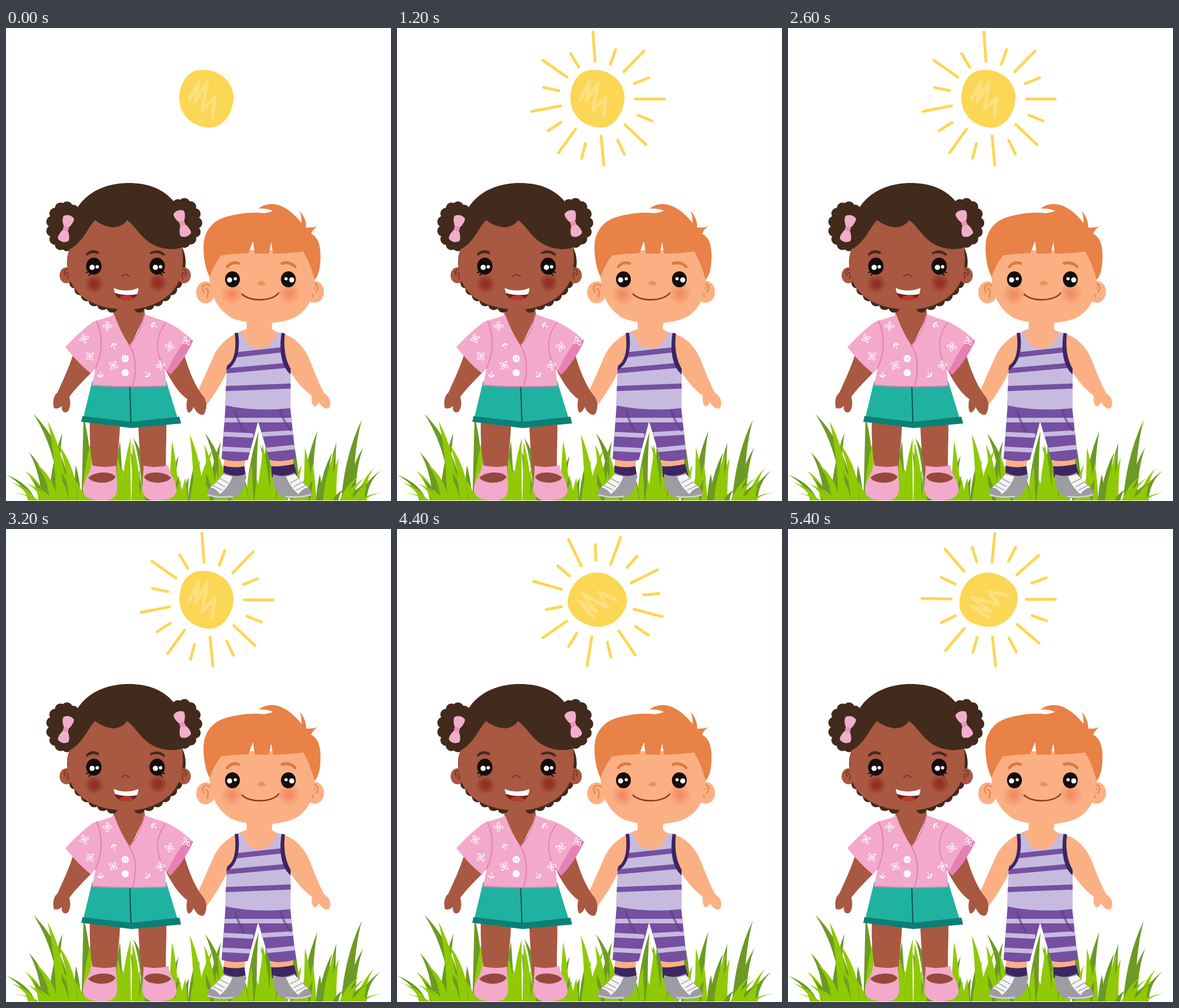
These frames come from a looping animation (675x830 px, 5610 ms). An HTML page:

```html
<!DOCTYPE html>
<html lang="en">
<head>
<meta charset="utf-8">
<title>Two friends under the sun</title>
<style>
  html, body { margin: 0; width: 100%; height: 100%; overflow: hidden; background: #fff; }
  svg { display: block; width: 100vw; height: 100vh; }
  .skin { fill: #a95841; }
  .hair { fill: #422a1d; }
  .pink { fill: #f3a9cc; }
  .peach { fill: #fbb084; }
  .ginger { fill: #e88246; }
  .lilac { fill: #c7badf; }
  .purple { fill: #754fa0; }
  .plum { fill: #3d2562; }
  .eye { fill: #140d0c; }
  .white { fill: #fff; }
  .line { fill: none; stroke-linecap: round; stroke-linejoin: round; }
</style>
</head>
<body>
<svg viewBox="0 0 675 830" preserveAspectRatio="none">
  <defs>
    <radialGradient id="blushDark">
      <stop offset=".3" stop-color="#8d2a20" stop-opacity=".85"/><stop offset="1" stop-color="#8d2a20" stop-opacity="0"/>
    </radialGradient>
    <radialGradient id="blushLight">
      <stop offset=".1" stop-color="#f28a62"/><stop offset="1" stop-color="#f28a62" stop-opacity="0"/>
    </radialGradient>
    <path id="lobe" d="M0 2C-7-4-12-17-9-21Q0-27 9-21C12-17 7-4 0 2Z"/>
    <g id="bow" fill="#f1aecb">
      <use href="#lobe"/><use href="#lobe" transform="rotate(180)"/>
      <ellipse rx="5" ry="4.5" fill="#e993ba"/>
    </g>
    <g id="flower" class="line" stroke="#fff" stroke-width="1.1"></g>
    <path id="sprig" class="white" d="M0 6Q-1 0 1-6L2-5Q0 0 1 6ZM0 5Q-5 4-5 0Q-1 0 0 5ZM1 5Q6 4 6 0Q2 0 1 5Z"/>
    <g id="ear">
      <ellipse rx="12" ry="14" stroke="none"/>
      <path class="line" stroke-width="2" d="M6-8C-1-14-7-7-2 0M0-5Q5-4 2 6"/>
    </g>
    <g id="girlEye">
      <ellipse class="eye" rx="13.5" ry="15"/>
      <circle class="white" cx="-3" cy="2" r="4.6"/><circle class="white" cx="6" cy="1" r="3"/>
    </g>
    <path id="lashes" class="line" stroke="#140d0c" stroke-width="1.8" d="M-8 10L-13 11M-5 13L-9 16"/>
    <g id="girlShoe">
      <path class="pink" d="M149 767C149 781 134 794 135 812C136 826 154 829 170 829C189 829 195 820 195 806C194 790 193 780 193 768Q170 773 149 767Z"/>
      <path fill="#96493a" d="M144 789Q153 781 168 780Q187 779 192 788Q186 798 166 798Q150 797 144 789Z"/>
    </g>
    <g id="boyShoe">
      <path fill="#9d9ca2" d="M382 780C374 796 352 806 352 817C354 826 386 826 400 824C414 819 421 803 420 783Q401 790 382 780Z"/>
      <path fill="#f4f4f5" d="M381 783Q366 801 358 806Q369 808 375 818Q390 806 397 787Z"/>
      <path class="line" stroke="#a9a8ad" stroke-width="1.6" d="M374 790L389 798M369 797L383 805M363 803L379 811"/>
      <path class="line" stroke="#d5d4d8" stroke-width="2.5" d="M354 819Q371 825 397 822"/>
    </g>
    <clipPath id="mouthClip"><path id="mouth" d="M189 456C200 462 220 462 232 456C233 470 224 478 211 478C197 478 189 469 189 456Z"/></clipPath>
    <clipPath id="tankClip"><path id="tank" d="M401 535L415 534C421 572 467 572 474 534L488 535C483 570 489 590 499 606L499 667Q440 674 384 662L387 598C402 590 408 570 401 535Z"/></clipPath>
    <clipPath id="shortsClip"><path id="shorts" d="M385 662Q440 674 498 663L508 755Q485 763 462 758L442 690L424 758Q400 763 378 756Z"/></clipPath>
  </defs>

  <g id="sun">
    <g id="rays" class="line" stroke="#fcd655" stroke-width="5"></g>
    <path fill="#fcd655" d="M338 74C374 70 399 95 399 122C398 152 378 176 356 175C324 173 303 150 304 121C305 96 318 76 338 74Z"/>
    <path class="line" stroke="#fce07f" stroke-width="6" d="M321 126L338 94L332 128L353 95L344 144L366 122L362 156"/>
  </g>

  <g id="grass"></g>

  <g id="boy">
    <path class="peach" d="M422 505L422 528C392 538 372 555 362 580C352 603 342 625 334 643C331 652 334 666 346 668C362 650 378 624 390 598L410 585L480 585L497 600C508 620 523 636 536 645C535 655 537 662 541 664C546 663 547 659 549 657C553 664 560 670 566 667C571 659 569 648 558 641C549 625 541 604 534 586C524 560 508 544 488 537C474 534 466 530 466 526L468 505Z"/>
    <path class="peach" d="M383 752L381 772L418 772L420 752ZM465 752L465 770L504 768L503 752Z"/>
    <path class="plum" d="M381 768Q400 773 418 769L421 790L382 790ZM465 769Q484 770 505 765L511 788L466 788Z"/>
    <use href="#boyShoe"/>
    <use href="#boyShoe" transform="matrix(-1 0 0 1 888 0)"/>

    <use href="#shorts" class="purple"/>
    <g clip-path="url(#shortsClip)">
      <path class="line" stroke="#c7badf" stroke-width="8" d="M370 688L515 688M370 712L430 715M450 713L515 709M370 738L430 741M450 741L520 734"/>
      <path class="line" stroke="#5b3c89" stroke-opacity=".6" stroke-width="4" d="M402 672Q407 691 417 707M480 668Q486 690 499 706"/>
    </g>
    <use href="#tank" class="lilac"/>
    <path class="line" clip-path="url(#tankClip)" stroke="#754fa0" stroke-width="9" d="M380 576L500 563M380 602L505 591M380 633L505 628"/>
    <path class="plum" d="M401 535L407 535C412 570 402 594 386 600L388 592C402 583 404 560 401 535ZM483 535L489 536C486 562 490 582 499 598L499 608C481 592 479 562 483 535Z"/>

    <g class="peach" stroke="#e48a58">
      <use href="#ear" transform="translate(350 464)scale(1.38)"/>
      <use href="#ear" transform="translate(541 463)scale(-1.38 1.38)"/>
    </g>
    <path class="peach" d="M358 390C352 450 360 486 394 508C420 521 480 522 508 507C541 488 546 450 537 390Z"/>
    <path class="ginger" d="M357 437C347 418 344 386 348 369C354 348 368 337 384 332C404 326 430 322 452 325Q464 323 468 321Q457 316 443 317C455 306 474 308 484 313C500 321 510 332 518 342Q519 331 515 321C523 331 527 340 526 350Q537 351 546 348Q538 353 535 361C549 368 553 386 551 412C550 424 547 436 541 442Q533 411 521 392Q495 396 468 396L465 376L461 396L436 396L433 374L425 395Q398 396 377 399Q363 418 357 437Z"/>
    <path class="line" stroke="#d97b40" stroke-width="5" d="M388 419Q396 409 408 413M484 413Q497 409 507 419"/>
    <circle cx="396" cy="467" r="21" fill="url(#blushLight)"/>
    <circle cx="496" cy="466" r="21" fill="url(#blushLight)"/>
    <g class="eye"><ellipse cx="397" cy="441" rx="13" ry="14"/><ellipse cx="495" cy="441" rx="13" ry="14"/></g>
    <g class="white"><circle cx="392" cy="442" r="4.5"/><circle cx="402" cy="440" r="2.8"/><circle cx="501" cy="442" r="4.5"/><circle cx="491" cy="440" r="2.8"/></g>
    <path fill="#ee8f60" d="M440 449Q448 438 456 449Q448 455 440 449Z"/>
    <path class="line" stroke="#8e3d24" stroke-width="2.6" d="M414 467C426 480 466 481 478 465"/>
  </g>

  <g id="girl">
    <path class="skin" d="M147 690C146 725 149 752 153 784L193 784C195 750 199 725 200 694ZM232 696C233 730 236 755 238 784L281 784C279 750 282 720 281 692Z"/>
    <use href="#girlShoe"/>
    <use href="#girlShoe" transform="matrix(-1 0 0 1 434 0)"/>

    <path class="skin" d="M118 572C109 600 97 624 90 640C82 646 82 660 84 667C91 669 95 666 98 663C96 673 104 678 109 672C114 664 113 655 111 647C122 632 138 617 150 604ZM278 596C290 622 306 644 318 651C315 662 317 672 320 675C326 673 327 669 329 665C333 674 340 681 347 678C353 668 353 654 345 645C335 632 324 612 313 575Z"/>
    <path fill="#20b2a0" d="M151 620L135 686L219 695L301 685L281 620Z"/>
    <path fill="#0b8075" d="M134 681L132 691L220 702L307 694L304 682L220 691Z"/>
    <path class="line" stroke="#164f49" stroke-width="2" d="M217 628L219 691"/>

    <path class="skin" d="M190 480L188 506L216 562L244 504L240 480Z"/>
    <path class="pink" d="M190 503C178 509 164 511 152 516C133 530 117 546 104 560C118 577 132 593 149 606L157 597L151 627Q215 631 281 628L278 597L288 608C302 594 317 573 328 549C310 531 287 515 264 510L243 502C236 529 226 545 217 558C205 540 196 521 190 503Z"/>
    <path fill="#e780b6" d="M321 542L328 549C317 573 302 594 288 608L282 602C292 582 304 557 321 542Z"/>
    <path class="line" stroke="#e37fb3" stroke-width="2" d="M159 514C170 540 170 568 157 597M280 517C262 540 261 568 278 598M217 558C229 577 229 605 222 628M243 503Q234 538 216 558M152 627Q215 631 280 628"/>
    <g id="print"></g>
    <g class="white"><circle cx="209" cy="580" r="6.3"/><circle cx="209" cy="605" r="6.3"/></g>
    <path class="line" stroke="#d7b7c9" stroke-width="2" d="M207 579h.1M211 579h.1M207 582h.1M211 582h.1"/>

    <g id="curls" class="hair"></g>
    <ellipse class="hair" cx="211" cy="411" rx="104" ry="78"/>
    <g class="skin" stroke="#793525">
      <use href="#ear" transform="translate(106 434)"/>
      <use href="#ear" transform="translate(312 434)scale(-1 1)"/>
    </g>
    <path class="skin" d="M150 325L113 383C102 416 106 450 136 473C160 490 190 494 212 494C250 494 289 476 302 446C312 422 311 400 308 380L240 325Z"/>
    <path class="hair" d="M112 388C102 325 140 272 216 272C280 272 316 311 319 381C300 391 276 390 256 379C236 368 226 346 212 337Q206 348 188 350Q170 348 156 337C143 351 134 377 112 388Z"/>
    <use href="#bow" transform="translate(105 352)rotate(14)"/>
    <use href="#bow" transform="translate(309 343)rotate(-18)"/>
    <path class="hair" d="M140 397Q149 385 163 393L162 397Q150 392 142 400ZM252 394Q267 385 279 397L277 400Q266 392 253 397Z"/>
    <circle cx="155" cy="449" r="17" fill="url(#blushDark)"/>
    <circle cx="266" cy="447" r="17" fill="url(#blushDark)"/>
    <use href="#girlEye" x="154" y="418"/><use href="#lashes" x="154" y="418"/>
    <use href="#girlEye" x="265" y="418"/><use href="#lashes" transform="translate(265 418)scale(-1 1)"/>
    <path class="line" stroke="#793525" stroke-width="2.2" d="M203 436Q209 429 216 436"/>
    <use href="#mouth" fill="#73201b"/>
    <g clip-path="url(#mouthClip)">
      <ellipse cx="211" cy="478" rx="14" ry="9" fill="#b63a30"/>
      <path class="white" d="M186 452L235 452L230 467Q210 471 191 465Z"/>
    </g>
  </g>
</svg>

<script>
const NS = "http://www.w3.org/2000/svg";
const byId = id => document.getElementById(id);
function add(parent, tag, attrs) {
  const el = document.createElementNS(NS, tag);
  for (const k in attrs) el.setAttribute(k, attrs[k]);
  return byId(parent).appendChild(el);
}

let seed = 11;
function random() {
  seed = (seed * 16807) % 2147483647;
  return seed / 2147483647;
}

// Curls sit on ellipses: two buns, plus a row under each cheek.
function curls(cx, cy, rx, ry, from, to, n) {
  for (let i = 0; i <= n; i++) {
    const a = (from + (to - from) * i / n) * Math.PI / 180;
    add("curls", "circle", { cx: cx + rx * Math.cos(a), cy: cy + ry * Math.sin(a), r: 10 });
  }
}
function bun(cx, cy) {
  add("curls", "ellipse", { cx, cy, rx: 27, ry: 36 });
  curls(cx, cy, 24, 34, 0, 360, 13);
}
bun(104, 348);
bun(310, 342);
curls(210, 412, 99, 80, 154, 104, 5);
curls(210, 412, 99, 80, 76, 26, 5);

// Shirt print
for (let a = 20; a < 380; a += 90)
  add("flower", "ellipse", { cx: 4, cy: -2, rx: 3.8, ry: 1.9, transform: `rotate(${a})` });
function scatter(kind, spots) {
  spots.forEach(([x, y], i) =>
    add("print", "use", { href: "#" + kind, transform: `translate(${x} ${y})rotate(${i * 160})` }));
}
scatter("flower", [[178, 523], [137, 545], [147, 576], [188, 592], [287, 559], [271, 592], [317, 549]]);
scatter("sprig", [[165, 608], [190, 558], [247, 608], [260, 521]]);

// Grass: blades rise straight, then bend; the outer ones lean outwards.
const DARK = "#6c9a24", LIGHT = "#90c905", GROUND = 829;
function blade(base, x, y, fill) {
  const h = GROUND - y, w = 4 + h / 22;
  const mid = base + (x - base) * .15, cy = y + h * .42;
  add("grass", "path", {
    fill,
    d: `M${base - w} ${GROUND}Q${mid - w * .7} ${cy} ${x} ${y}Q${mid + w * .7} ${cy - h * .05} ${base + w} ${GROUND}Z`
  });
}
function meadow(n, low, high, fill) {
  for (let i = 0; i < n; i++) {
    const base = 45 + 585 * (i + random()) / n;
    const side = (base - 338) / 293;
    const h = (low + (high - low) * random()) * (1 - .45 * side ** 6);
    blade(base, base + 42 * side ** 5 + (random() - .5) * h * .45, GROUND - h, fill);
  }
}
meadow(24, 50, 125, DARK);
const tall = [[105, 48, 677], [84, 99, 710], [143, 136, 681], [382, 349, 711], [528, 546, 707], [598, 624, 687]];
tall.forEach(b => blade(...b, DARK));
meadow(36, 55, 112, LIGHT);
blade(98, 73, 690, LIGHT);
blade(338, 322, 713, LIGHT);
meadow(24, 22, 55, DARK);
meadow(44, 22, 60, LIGHT);

// Sixteen sun rays, long and short in turn, a little uneven like a drawing.
const SUN_X = 351.7, SUN_Y = 124, RAYS = 16;
const rays = Array.from({ length: RAYS }, (_, i) => {
  const turn = i * 2 * Math.PI / RAYS;
  const angle = (-94 + 22.5 * i + 5 * Math.sin(turn) - i / 6) * Math.PI / 180;
  const drift = 9 * Math.cos(turn);
  const [from, to] = i % 2 ? [73 - drift, 100 - drift] : [66, 117];
  return { from, to, el: add("rays", "line", { transform: `translate(${SUN_X} ${SUN_Y})rotate(${angle * 180 / Math.PI})`, x1: from }) };
});

const LOOP = 5610, STEP = 200, TURN_FROM = 21;

function draw(step) {
  const grow = Math.min(1, step / 4);
  byId("rays").style.visibility = step ? "visible" : "hidden";
  for (const { from, to, el } of rays) el.setAttribute("x2", from + (to - from) * grow);
  // After the cut the sun sits turned and drifts on slowly.
  const angle = step < TURN_FROM ? 0 : -67 - 3 * (step - TURN_FROM);
  byId("sun").setAttribute("transform", `rotate(${angle} ${SUN_X} ${SUN_Y})`);
}

let start = null;
function tick(now) {
  start ??= now;
  draw(Math.min(27, Math.floor((now - start) % LOOP / STEP)));
  requestAnimationFrame(tick);
}
draw(0);
requestAnimationFrame(tick);
</script>
</body>
</html>
```
